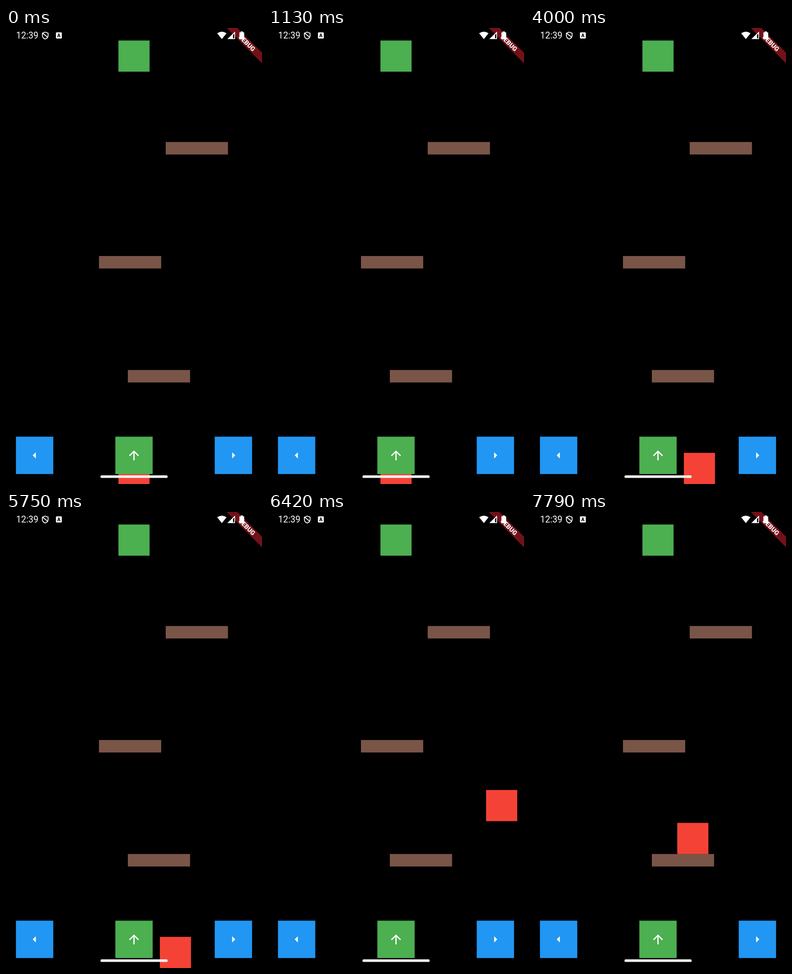
Write an HTML page that moves like this. It is 561x998 px and loops after 8000 ms.

```html
<!DOCTYPE html>
<html lang="en">
<head>
<meta charset="utf-8">
<title>Platform game</title>
<style>
  html, body { margin: 0; height: 100%; overflow: hidden; background: #000; }
  svg { display: block; width: 100vw; height: 100vh; }
  text { font-family: Roboto, sans-serif; fill: #fff; }
</style>
</head>
<body>
<svg viewBox="0 0 561 998">
  <rect width="561" height="998"/>

  <g fill="#795548">
    <rect x="350" y="249.5" width="136.4" height="27.3"/>
    <rect x="203.7" y="499" width="136.4" height="27.3"/>
    <rect x="267" y="748.5" width="136.4" height="27.3"/>
  </g>
  <rect x="246.4" y="27.4" width="68.2" height="68.2" fill="#4caf50"/>
  <rect id="player" width="68.2" height="68.2" fill="#f44336"/>

  <!-- Controls -->
  <rect x="21.8" y="894.4" width="81.8" height="81.8" fill="#2196f3"/>
  <rect x="239.6" y="894.4" width="81.8" height="81.8" fill="#4caf50"/>
  <rect x="457.4" y="894.4" width="81.8" height="81.8" fill="#2196f3"/>
  <g fill="#fff">
    <path transform="translate(46.3 919) scale(1.364)" d="M14 7l-5 5 5 5z"/>
    <path transform="translate(264.1 919) scale(1.364)" d="M4 12l1.41 1.41L11 7.83V20h2V7.83l5.58 5.59L20 12l-8-8z"/>
    <path transform="translate(481.9 919) scale(1.364)" d="M10 17l5-5-5-5z"/>
  </g>

  <!-- Corner banner -->
  <g transform="translate(561 0) rotate(45)">
    <rect x="-54.6" y="38.2" width="109.2" height="16.4" fill="#731118"/>
    <text y="51.4" font-size="13.9" font-weight="900" text-anchor="middle">DEBUG</text>
  </g>

  <!-- Status bar -->
  <text x="22.3" y="23" font-size="19.5">12:39</text>
  <path d="M86 9l6.3 2.4v4.8c0 3.8-2.6 6.600-6.300 7.900-3.700-1.300-6.300-4.100-6.300-7.900v-4.800zM80.500 11.500l10.500 8.500" fill="none" stroke="#fff" stroke-width="1.8"/>
  <rect x="109.500" y="9.500" width="12.800" height="13.500" rx="1.500" fill="#fff"/>
  <text x="115.900" y="20.200" font-size="10.500" font-weight="900" text-anchor="middle" style="fill:#000">A</text>
  <g fill="#fff">
    <path d="M473 24.300L462.700 11.500Q473 4.500 483.300 11.500z"/>
    <path d="M485 24.300L502 7.700V24.300z"/>
    <path d="M514.500 7.500h4.500v2h3v15.300h-10.500V9.500h3z"/>
  </g>
  <path d="M497.500 15l2.800-2.800V22.600h-2.800z"/>

  <rect x="207" y="979" width="147.300" height="5.800" rx="2.900" fill="#eee"/>
</svg>
<script>
const LOOP = 8000, STEP = 1000 / 24;
const GROUND = 929.8, LEDGE = 680.4;
const JUMP_AT = 5858, JUMP_SPEED = 956.3, GRAVITY = 1364;
// Player's horizontal path: [ms, x]
const path = [
  [0, 246.4], [2860, 246.4], [3083, 337.2], [5765, 337.2],
  [6110, 478], [6527, 478], [6906, 322.700], [LOOP, 322.700]
];
const player = document.getElementById('player');

function playerX(t) {
  const i = path.findIndex(p => p[0] > t);
  const [t0, x0] = path[i - 1], [t1, x1] = path[i];
  return x0 + (x1 - x0) * (t - t0) / (t1 - t0);
}

function playerY(t) {
  const s = (t - JUMP_AT) / 1000;
  if (s < 0) return GROUND;
  const y = GROUND - JUMP_SPEED * s + GRAVITY * s * s / 2;
  return s > JUMP_SPEED / GRAVITY ? Math.min(y, LEDGE) : y;
}

function draw() {
  const now = performance.now() % LOOP;
  const t = Math.min(Math.floor((now + 4) / STEP) * STEP, LOOP - STEP);
  player.setAttribute('x', playerX(t));
  player.setAttribute('y', playerY(t));
  requestAnimationFrame(draw);
}
draw();
</script>
</body>
</html>
```
